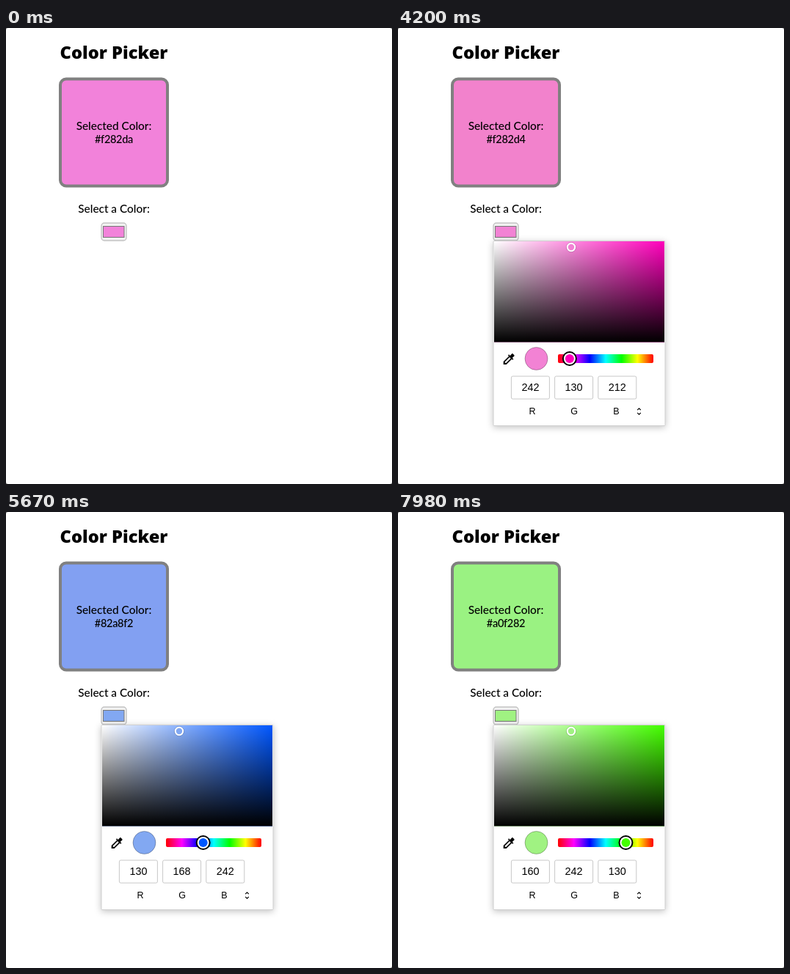
Write an HTML page that moves like this. It is 526 px wide and 622 px high and loops after 8000 ms.

```html
<!DOCTYPE html>
<html lang="en">
<head>
<meta charset="utf-8">
<title>Color Picker</title>
<style>
  html, body { margin: 0; width: 100%; height: 100%; overflow: hidden; background: #fff; }
  svg { display: block; width: 100vw; height: 100vh; }
  text { text-anchor: middle; }
  .page { font: 500 15.4px Lato, "Open Sans", sans-serif; }
  .page .title { font: 800 23.7px "Open Sans", Lato, sans-serif; }
  .page .code { font-size: 14.5px; letter-spacing: -.3px; }
  .popup { font: 12.5px "Liberation Sans", Arial, sans-serif; }
  .popup .value { font-size: 14.4px; }
  .panel { filter: drop-shadow(0 2px 5px rgba(0, 0, 0, .24)); }
  .field { fill: #fff; stroke: #c8c8c8; }
</style>
</head>
<body>
<svg viewBox="0 0 526 622" xmlns="http://www.w3.org/2000/svg">
  <defs>
    <linearGradient id="white"><stop stop-color="#fff"/><stop offset="1" stop-color="#fff" stop-opacity="0"/></linearGradient>
    <linearGradient id="black" x2="0" y2="1"><stop stop-opacity="0"/><stop offset="1"/></linearGradient>
    <linearGradient id="spectrum">
      <stop stop-color="#f00"/><stop offset=".1667" stop-color="#f0f"/><stop offset=".3333" stop-color="#00f"/>
      <stop offset=".5" stop-color="#0ff"/><stop offset=".6667" stop-color="#0f0"/>
      <stop offset=".8333" stop-color="#ff0"/><stop offset="1" stop-color="#f00"/>
    </linearGradient>
  </defs>
  <rect width="526" height="622" fill="#777"/>
  <rect width="526" height="622" rx="3" fill="#fff"/>

  <g class="page">
    <text class="title" x="147" y="42">Color Picker</text>
    <rect id="box" x="74" y="69.5" width="146" height="146" rx="8" stroke="#808080" stroke-width="4"/>
    <text x="147" y="139">Selected Color:</text>
    <text class="code" id="code" x="147" y="157"></text>
    <text x="147" y="252">Select a Color:</text>
    <rect x="130" y="266" width="34" height="24" rx="4" fill="#f2f2f2" stroke="#c2c2c2" stroke-width="1.4"/>
    <rect id="swatch" x="132.5" y="270.5" width="28.5" height="15" stroke="#777"/>
  </g>

  <g class="popup" id="popup">
    <rect class="panel" x="130" y="290.5" width="234" height="252" rx="1" fill="#fff" stroke="#cfcfcf"/>
    <rect id="hueField" x="131" y="291" width="232" height="137.5"/>
    <rect x="131" y="291" width="232" height="137.5" fill="url(#white)"/>
    <rect x="131" y="291" width="232" height="137.5" fill="url(#black)"/>
    <circle cx="236" cy="299" r="6.6" fill="none" stroke="#000" stroke-opacity=".15"/>
    <circle id="point" cx="236" cy="299" r="5.2" stroke="#fff" stroke-width="2"/>

    <path transform="translate(141.2 441.6) scale(.83)" d="M20.71 5.63l-2.34-2.34c-.39-.39-1.02-.39-1.41 0l-3.12 3.12-1.93-1.91-1.41 1.41 1.42 1.42L3 16.25V21h4.75l8.92-8.92 1.42 1.42 1.41-1.41-1.92-1.92 3.12-3.12c.4-.4.4-1.03.01-1.42zM6.92 19L5 17.08l8.06-8.06 1.92 1.92L6.92 19z"/>
    <circle id="preview" cx="188.5" cy="451" r="15.5" stroke="#000" stroke-opacity=".27"/>
    <rect x="218" y="445" width="130" height="12" rx="2" fill="url(#spectrum)"/>
    <g id="knob">
      <circle r="10"/>
      <circle r="8" fill="#fff"/>
      <circle id="knobFill" r="6"/>
    </g>
    <g id="inputs"></g>
    <path d="M326.2 521.2l2.3-2.4 2.3 2.4M326.2 524.8l2.3 2.4 2.3-2.4" fill="none" stroke="#000" stroke-width="1.2"/>
  </g>
</svg>
<script>
  const LOOP = 8000, STEP = 70, POPUP_AT = 2170;
  const $ = id => document.getElementById(id);

  // [time in ms, hue in degrees] along the slider drag
  const drag = [
    [0, 312.86], [3850, 312.86], [3920, 318], [3990, 332], [4060, 332], [4130, 325],
    [4200, 316.07], [4480, 285], [4760, 256.07], [5110, 234], [5460, 221.5],
    [5670, 219.64], [6090, 202], [7070, 148.93], [7630, 106], [7840, 103.93], [LOOP, 103.93]
  ];

  $("inputs").innerHTML = ["R", "G", "B"].map((name, i) => {
    const x = 180.4 + i * 59.2;
    return `<rect class="field" x="${x - 26}" y="475" width="52" height="31" rx="2"/>
      <text class="value" x="${x}" y="495"></text>
      <text x="${183 + i * 57.2}" y="527">${name}</text>`;
  }).join("");
  const values = document.querySelectorAll(".value");

  function hueAt(t) {
    const i = Math.max(1, drag.findIndex(([time]) => time >= t));
    const [t0, h0] = drag[i - 1], [t1, h1] = drag[i];
    return h0 + (h1 - h0) * Math.max(0, t - t0) / (t1 - t0);
  }

  function toRgb(hue, min, max) {
    return [5, 3, 1].map(n => {
      const k = (n + hue / 60) % 6;
      return Math.round(max - (max - min) * Math.max(0, Math.min(k, 4 - k, 1)));
    });
  }

  const pastel = t => toRgb(hueAt(t), 130, 242);
  const css = rgb => `rgb(${rgb.map(Math.round)})`;
  const paint = (id, color) => $(id).setAttribute("fill", color);

  // The large box trails the picked color, like a short CSS transition.
  function trailing(t) {
    const sum = [0, 0, 0], count = 8;
    for (let k = 0; k < count; k++) {
      pastel(Math.max(0, t - k * STEP)).forEach((v, i) => sum[i] += v / count);
    }
    return sum;
  }

  function render(time) {
    const t = Math.floor(time % LOOP / STEP) * STEP;
    const hue = hueAt(t), rgb = pastel(t);
    const pure = css(toRgb(hue, 0, 255));

    paint("box", css(trailing(t)));
    ["swatch", "preview", "point"].forEach(id => paint(id, css(rgb)));
    ["hueField", "knobFill"].forEach(id => paint(id, pure));
    $("code").textContent = "#" + rgb.map(v => v.toString(16).padStart(2, "0")).join("");
    values.forEach((el, i) => el.textContent = rgb[i]);
    $("knob").setAttribute("transform", `translate(${218 + 130 * (1 - hue / 360)} 451)`);
    $("popup").setAttribute("visibility", t >= POPUP_AT ? "visible" : "hidden");
  }

  const start = performance.now();
  function tick() {
    render(performance.now() - start);
    requestAnimationFrame(tick);
  }
  tick();
</script>
</body>
</html>
```
